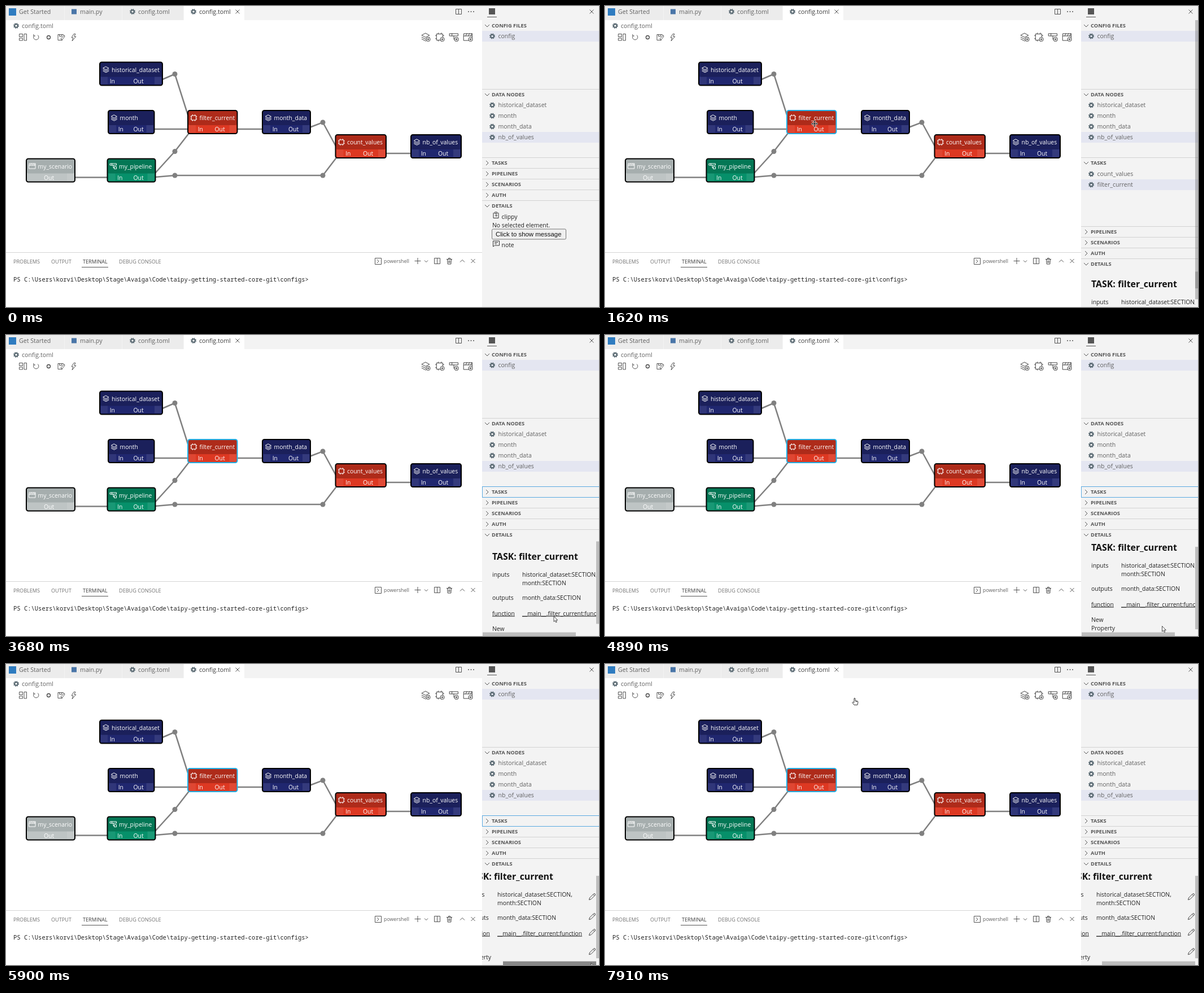
An HTML page that plays this animation: 1050 by 533 pixels, repeating every 8 s.

```html
<!DOCTYPE html>
<html lang="en">
<head>
<meta charset="utf-8">
<title>Config graph editor</title>
<style>
html, body { margin: 0; width: 100%; height: 100%; overflow: hidden; background: #fff; }
svg { display: block; }
text { font: 10.5px "Open Sans", "Noto Sans", sans-serif; fill: #616161; white-space: pre; }
.tab { font-size: 10.65px; }
.head { font-size: 9.3px; font-weight: 700; fill: #555; }
.cap { font-size: 9.1px; fill: #707070; }
.on { fill: #3c3c3c; }
.shell { font-size: 8.8px; }
.term { font: 10.5px "Noto Sans Mono", "DejaVu Sans Mono", monospace; fill: #222; }
.btn { font: 11.4px "Liberation Sans", Arial, sans-serif; fill: #111; }
.doc { font-size: 10.4px; fill: #222; }
.link { font-size: 10.3px; text-decoration: underline; }
.title { font-size: 15.85px; font-weight: 700; fill: #111; }
.white { font-size: 10.4px; fill: #fff; }
.pick { font-size: 10.65px; fill: #fff; }
.icon { fill: none; stroke-linejoin: round; stroke-linecap: round; }
.icon * { vector-effect: non-scaling-stroke; }
</style>
</head>
<body>
<svg id="stage" width="100%" height="100%" viewBox="0 0 1050 533">
  <defs>
    <filter id="shadow" x="-5%" y="-20%" width="110%" height="150%">
      <feDropShadow dx="0" dy="0" stdDeviation="3" flood-opacity=".3"/>
    </filter>
    <g id="gear" fill="none" stroke="#56666f">
      <circle r="2.8" stroke-width="2"/>
      <circle r="4.2" stroke-width="1.6" stroke-dasharray="1.75 1.55"/>
    </g>
    <g id="pencil" fill="none" stroke="#444" stroke-width="1">
      <path d="M-5.5 5.5L-4.5 2L3 -5.5Q5.5 -6 5.5 -3L-2 4.5ZM1.5 -4L4 -1.5"/>
    </g>
    <g id="arrow" fill="#fff" stroke="#222" stroke-width=".8">
      <path d="M0 0V9.6L2.2 7.6L3.8 11L5.3 10.3L3.8 7H6.8Z"/>
    </g>
    <g id="hand" fill="#fff" stroke="#222" stroke-width=".9" stroke-linejoin="round">
      <path d="M-1 1Q0 -.6 1 1V5L5 5.8Q6.2 6.2 6 7.6L5 12.5H-1L-4 8.4Q-4 6.6 -1 8.2Z"/>
      <path d="M2.4 5.3V7M4.2 5.7V7.2" fill="none"/>
    </g>
    <g id="move">
      <path d="M-6 0L-3.4 -2.5V-1H-1V-3.4H-2.5L0 -6L2.5 -3.4H1V-1H3.4V-2.5L6 0L3.4 2.5V1H1V3.4H2.5L0 6L-2.5 3.4H-1V1H-3.4V2.5Z" fill="#222" stroke="#fff" stroke-width=".7"/>
    </g>
  </defs>
  <g id="editor"></g>
  <g id="graph"></g>
  <g id="panel"></g>
  <g id="side"></g>
  <g id="kids"></g>
  <g id="tail"></g>
  <svg id="view" x="843" width="202"><g id="idle"></g><g id="doc"></g></svg>
  <rect id="focus" x="843.5" y="268.5" width="207" height="19" fill="none" stroke="#5aa9e0"/>
  <g fill="#646465" fill-opacity=".38">
    <rect id="outer" x="1045" y="25" width="5" height="475"/>
    <rect id="vbar" x="1045" width="5"/>
    <rect id="hbar" y="526.5" width="165" height="6.5"/>
  </g>
  <g id="dialog"></g>
  <use id="cursor"/>
</svg>
<script>
const $ = id => document.getElementById(id);
const add = (id, ...parts) => { $(id).innerHTML += parts.join(''); };

const rect = (x, y, w, h, fill, more = '') =>
  `<rect x="${x}" y="${y}" width="${w}" height="${h}" fill="${fill}" ${more}/>`;
const text = (x, mid, str, cls = '') =>
  `<text x="${x}" y="${mid + (/head|cap|shell/.test(cls) ? 3.3 : 3.8)}" class="${cls}">${str}</text>`;
const path = (d, color = '#555', width = 1) =>
  `<path d="${d}" fill="none" stroke="${color}" stroke-width="${width}"/>`;
const use = (id, x, y) => `<use href="#${id}" x="${x}" y="${y}"/>`;
const cross = (x, y, r = 3.5) => path(`M${x - r} ${y - r}l${2 * r} ${2 * r}m0 ${-2 * r}l${-2 * r} ${2 * r}`);
const chevron = (x, y, open) => path(open ? `M${x - 4} ${y - 2}l4 4l4 -4` : `M${x - 2} ${y - 4}l4 4l-4 4`);

const shapes = {
  data: 'M0 -5L5 -2.3L0 .4L-5 -2.3ZM-5 .2L0 2.8L5 .2M-5 2.6L0 5.2L5 2.6',
  task: 'M-4 -4H4V4H-4ZM-2 -4V-5.5M2 -4V-5.5M-2 4V5.5M2 4V5.5M-4 -2H-5.5M-4 2H-5.5M4 -2H5.5M4 2H5.5',
  pipe: 'M-5.5 -4.5H5.5V-1.5H-5.5ZM-2.5 -4.5V-1.5M0 -1.5V3H2M2 1H5.5V5H2Z',
  scene: 'M-5.5 -1.5H5.5V4.5H-5.5ZM-5.5 -1.5V-4.5H5.5V-1.5M-3 -1.5L-1.5 -4.5M.5 -1.5L2 -4.5M3.5 -1.5L5 -4.5'
};
const icon = (name, x, y, color, scale = 1) =>
  `<g class="icon" transform="translate(${x} ${y}) scale(${scale})" stroke="${color}"><path d="${shapes[name]}"/></g>`;

// Editor tabs and toolbar
const tabs = [[0, 103, 23, 'Get Started'], [104, 101, 131, 'main.py'], [206, 108, 234, 'config.toml'], [315, 107, 342, 'config.toml']];
add('editor', rect(0, 0, 843, 25, '#f3f3f3'),
  ...tabs.map(([x, w, tx, name], i) =>
    rect(x, 0, w, 25, i < 3 ? '#ececec' : '#fff') + text(tx, 10.5, name, i < 3 ? 'tab' : 'tab on')),
  rect(5, 4, 13, 13, '#2f7cc0'), rect(116, 5.5, 9, 9, '#4a76a8'),
  use('gear', 224, 10), use('gear', 332, 10), cross(410, 10),
  path('M796.5 5.5h10v9h-10zM801.5 5.5v9'),
  ...[819, 823.5, 828].map(x => `<circle cx="${x}" cy="10" r="1" fill="#555"/>`),
  use('gear', 18, 35), text(28, 35, 'config.toml', 'tab'),
  path('M23.5 49.5h6v5h-6zM23.5 57h6v4h-6zM32 49.5h4.5v11.5h-4.5z'),
  path('M50 52A4.6 4.6 0 1 0 56 51.5M49 50V53H52'),
  '<circle cx="75.5" cy="55.5" r="3" fill="none" stroke="#444" stroke-width="1.3"/>',
  path('M100 60.5H92V50.5H101L103 52M94.5 50.5V53.5H99V50.5M97 58L103 52L104 54L99 60Z'),
  path('M120 49.5L116 56H119L117 62L124 54H120.5L123 49.5Z'),
  ...Object.keys(shapes).map((name, i) => {
    const x = 743 + 25 * i;
    return icon(name, x, 55, '#444', 1.35) +
      `<circle cx="${x + 4.5}" cy="59" r="3.6" fill="#fff" stroke="#444"/>` +
      path(`M${x + 2.5} 59h4m-2 -2v4`, '#444');
  }));

// Graph
const line = pts => path('M' + pts, '#808080', 2.5);
add('graph',
  ...['277 130L299 120.5L323 196', '262 218H322', '264 296L299 257.5L325 224',
    '264 303L299 300H561L587 266', '121 303.5H180', '409 218H454',
    '539 214.5L561 206L585 250', '672 261H718'].map(line),
  ...[[299, 120.5], [299, 257.5], [299, 300], [561, 300], [561, 206]]
    .map(([x, y]) => `<circle cx="${x}" cy="${y}" r="4.5" fill="#808080"/>`));

const colors = {
  data: ['#1b205b', '#20276f'], task: ['#ae2b1a', '#dd3822'],
  pipe: ['#047755', '#06906a'], scene: ['#a6aeae', '#bec4c4']
};
function node(type, x, y, w, name, out) {
  const [top, low] = colors[type], textX = x + (type === 'data' && w > 100 ? 22 : 21.5);
  return rect(x + 1, y + 1, w - 2, 41, low, 'rx="3.5"') +
    rect(x + 2, y + 2, w - 4, 25, top, 'rx="2.5"') +
    (type === 'scene' ? '' : rect(x + 3, y + 27, 12, 13, '#fff', 'opacity=".07"')) +
    rect(x + w - 15, y + 27, 12, 13, '#fff', 'opacity=".09"') +
    rect(x + 1, y + 1, w - 2, 41, 'none', `rx="3.5" stroke="#000" stroke-width="2" ${name === 'filter_current' ? 'id="picked"' : ''}`) +
    icon(type, textX - 10, y + 14, '#fff') + text(textX, y + 14.5, name, 'white') +
    (type === 'scene' ? '' : text(x + 18.7, y + 34.5, 'In', 'white')) + text(out, y + 34.5, 'Out', 'white');
}
add('graph',
  node('data', 165, 98.5, 113, 'historical_dataset', 225.5),
  node('data', 180, 184, 83.5, 'month', 225.5),
  node('task', 321, 184, 89.5, 'filter_current', 369.5),
  node('data', 453, 184, 87, 'month_data', 500),
  node('task', 582.5, 227, 91.5, 'count_values', 632),
  node('data', 716, 227, 91, 'nb_of_values', 765),
  node('scene', 35, 269.5, 88, 'my_scenario', 67),
  node('pipe', 178.5, 269.5, 87, 'my_pipeline', 225.5));

// Terminal panel
add('panel', rect(0, 436, 843, 1, '#d4d4d4'),
  text(13, 452.5, 'PROBLEMS', 'cap'), text(80, 452.5, 'OUTPUT', 'cap'),
  text(136, 452.5, 'TERMINAL', 'cap on'), text(200, 452.5, 'DEBUG CONSOLE', 'cap'),
  rect(134, 462, 47, 1, '#555'),
  path('M653.5 446.5h11v11h-11zM657 449l3 3l-3 3'), text(669, 452, 'powershell', 'shell'),
  path('M723.5 451.5h11m-5.5 -5.5v11M741 450.5l3 3l3 -3M758.5 446.5h10v10h-10zM763.5 446.5v10'),
  path('M780 448.5h10M781.5 448.5l.7 8.5h5.6l.7 -8.5M783.5 448v-1.5h3v1.5M784 450.5v4.5M786 450.5v4.5', '#444'),
  path('M804 453.5l4 -4l4 4'), cross(827, 451.5),
  text(13, 484.3, 'PS C:\\Users\\korvi\\Desktop\\Stage\\Avaiga\\Code\\taipy-getting-started-core-git\\configs&gt;', 'term'));

// Side bar
const row = (y, name, on) => (on ? rect(843, y - 9.5, 207, 19, '#e4e6f1') : '') + use('gear', 861, y) + text(871.5, y, name);
const rule = y => rect(843, y - 10, 207, 1, '#d2d2d2');
const header = (y, name, open) => chevron(852, y, open) + text(860, y, name, 'head');
add('side', rect(843, 0, 207, 533, '#f3f3f3'),
  rect(855, 4, 11, 11, '#555'), rect(852, 19, 17, 1, '#555'), cross(1037, 10),
  header(35, 'CONFIG FILES', true), row(53.5, 'config', true),
  rule(157), header(157, 'DATA NODES', true),
  ...['historical_dataset', 'month', 'month_data', 'nb_of_values'].map((n, i) => row(175.5 + 19 * i, n, i === 3)),
  rule(278), `<g id="closed">${header(278, 'TASKS', false)}</g>`);
add('kids', header(278, 'TASKS', true), row(297.5, 'count_values'), row(316.5, 'filter_current', true));
add('tail', rect(843, -9, 207, 300, '#f3f3f3'),
  ...['PIPELINES', 'SCENARIOS', 'AUTH', 'DETAILS'].map((n, i) => rule(19 * i) + header(19 * i, n, i === 3)));

// Details, drawn relative to the view's corner
add('idle',
  path('M21 3h-1v9h9v-9h-1M22.5 4v-2.5h4v2.5zM25 10v-4m-2 2l2 -2l2 2', '#333'), text(34.5, 10, 'clippy', 'doc'),
  text(18, 25, 'No selected element.', 'doc'),
  rect(17.5, 31.5, 131, 18, '#efefef', 'rx="2" stroke="#767676"'), text(24, 41, 'Click to show message', 'btn'),
  path('M19.5 52.5h11v8h-8l-3 2zM22 55h6M22 57.5h4', '#333'), text(34.5, 59.5, 'note', 'doc'));
add('doc', '<text x="18" y="5.5" class="title">TASK: filter_current</text>',
  text(18, 32, 'inputs', 'doc'), text(71, 32, 'historical_dataset:SECTION,', 'doc'), text(71, 47, 'month:SECTION', 'doc'),
  text(18, 73, 'outputs', 'doc'), text(71, 73, 'month_data:SECTION', 'doc'),
  text(18, 100.7, 'function', 'doc link'), text(71, 100.7, '__main__.filter_current:function', 'doc link'),
  text(18, 128, 'New', 'doc'), text(18, 143, 'Property', 'doc'),
  ...[36, 71, 99].map(y => use('pencil', 239, y)), `<g id="last">${use('pencil', 239, 133)}</g>`);

// Quick pick
add('dialog', rect(246, -6, 516, 78, '#f3f3f3', 'filter="url(#shadow)"'),
  text(443, 5.5, 'Select property for TASK.', 'tab'),
  rect(252, 22.5, 504.5, 23, '#fff', 'stroke="#5fb2ea"'), rect(258, 27, 1, 15, '#666'),
  rect(252, 50.5, 504.5, 19, '#0060c0', 'rx="1"'), text(261, 60, 'skippable', 'pick'));

// Each step changes only what it names
const at = (shape, x, y) => ({ cur: [shape, x, y] });
const steps = [
  [0, { cur: null, picked: false, kids: false, pipe: 297, sx: 0, sy: 0, focus: false, outer: false, drag: false, dialog: false, last: true }],
  [400, at('arrow', 264, 372)],
  [600, at('arrow', 296, 312)],
  [800, at('arrow', 336, 246)],
  [1000, at('move', 366, 212)],
  [1210, { ...at('move', 370, 208), picked: true }],
  [1410, { kids: true, pipe: 400, sy: 3, outer: true }],
  [1620, at('move', 371, 208.5)],
  [1820, at('arrow', 610, 240)],
  [2020, { ...at('hand', 868, 276), outer: false }],
  [2420, { ...at('hand', 877, 280), outer: true }],
  [2620, { ...at('hand', 879.5, 281), focus: true }],
  [2830, { kids: false, pipe: 340, sy: 0, outer: false }],
  [3030, { pipe: 299 }],
  [3280, { ...at('arrow', 947, 415), pipe: 297 }],
  [3480, at('arrow', 963, 470)],
  [3680, at('arrow', 970, 498)],
  [4090, { sy: 16 }],
  [4490, at('arrow', 980, 508)],
  [4690, at('arrow', 986, 513)],
  [4890, at('arrow', 986.5, 515.5)],
  [5090, { ...at('arrow', 992, 527), drag: true }],
  [5290, { ...at('arrow', 1010, 528), sx: 22 }],
  [5500, { ...at('arrow', 1030, 529), sx: 44 }],
  [5700, at('arrow', 1034, 529)],
  [5900, at('arrow', 1036, 529.5)],
  [6100, { ...at('arrow', 1038, 518), drag: false }],
  [6300, { ...at('arrow', 1037.5, 510.5), last: false }],
  [6500, { focus: false, dialog: true }],
  [6910, { ...at('arrow', 985, 452), last: true }],
  [7110, at('arrow', 800, 290)],
  [7310, at('arrow', 590, 135)],
  [7510, at('hand', 465, 68)],
  [7710, at('hand', 443, 60)],
  [7910, { ...at('hand', 442, 60), dialog: false }]
];

const set = (id, attrs) => { for (const k in attrs) $(id).setAttribute(k, attrs[k]); };
const show = (id, on) => { $(id).style.display = on ? '' : 'none'; };

function draw() {
  const now = performance.now() % 8000;
  const s = Object.assign({}, ...steps.filter(([t]) => t <= now).map(([, change]) => change));
  const top = s.pipe + 66.5;

  set('picked', { stroke: s.picked ? '#20b0e6' : '#000' });
  set('tail', { transform: `translate(0 ${s.pipe})` });
  set('view', { y: top, height: Math.max(0, (s.kids ? 533 : 526.5) - top) });
  set('doc', { transform: `translate(${-s.sx} ${28.5 - s.sy})` });
  set('vbar', { y: top + 2 + s.sy * 0.6, height: s.kids ? 49 : 146 });
  set('hbar', { x: 844 + s.sx * 36 / 44, 'fill-opacity': s.drag ? 0.75 : 0.38 });
  for (const id of ['kids', 'focus', 'outer', 'dialog', 'last']) show(id, s[id]);
  show('closed', !s.kids);
  show('idle', !s.picked);
  show('doc', s.picked);
  show('vbar', s.picked);
  show('hbar', s.picked && !s.kids);
  show('cursor', s.cur);
  if (s.cur) set('cursor', { href: '#' + s.cur[0], x: s.cur[1], y: s.cur[2] });
  requestAnimationFrame(draw);
}
draw();
</script>
</body>
</html>
```
